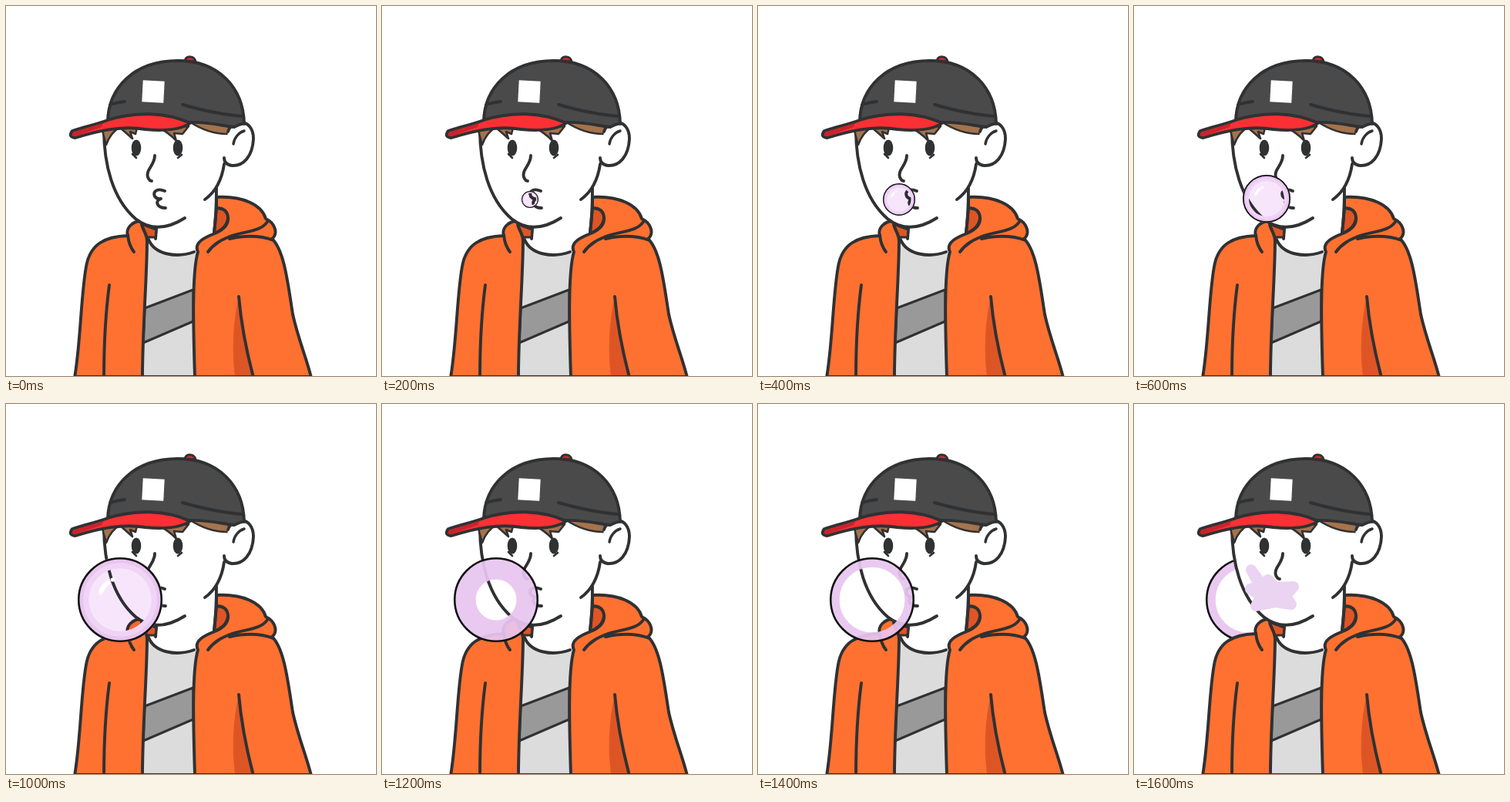
An HTML page for the animation above (1.8 s loop, 480x480 px).

```html
<!DOCTYPE html>
<html lang="en">
<head>
<meta charset="utf-8">
<title>Bubble gum</title>
<style>
  html, body { margin: 0; width: 100%; height: 100%; overflow: hidden; background: #fff; }
  svg { display: block; width: 100vw; height: 100vh; }
  .ink { fill: none; stroke: #303133; stroke-width: 3.9; stroke-linecap: round; stroke-linejoin: round; }
  .orange { fill: #ff7130; }
  .rust { fill: #de5525; }
  .white { fill: #fff; }
  .hair { fill: #a5734c; stroke-width: 2.6; }
</style>
</head>
<body>
<svg viewBox="0 0 480 480">
  <g id="behind"></g>

  <g class="ink">
    <!-- shirt and strap -->
    <path fill="#dcdcdc" stroke="none" d="M180 300H247V480H177Z"/>
    <path fill="#999" stroke-width="3" d="M180 392 243 368V409L178 437Z"/>

    <!-- neck -->
    <path class="white" stroke="none" d="M195 270 273 230 270 292 246 320Q207 331 184 304Z"/>
    <path d="M185 303C193 323 222 327 244 319M195 289 194 302"/>

    <!-- hood lining -->
    <path class="rust" d="M273 262C283 262 289 267 288 275C287 284 282 290 270 295Z"/>
    <path class="rust" stroke-width="3" d="M176 283 195 290 194 300 183 300Z"/>

    <!-- jacket -->
    <path class="orange" d="M89 482C97 436 97 376 104 338C109 309 128 299 158 298C155 288 164 279 176 279C174 287 182 292 183 304C183 350 177 420 177 482Z"/>
    <path class="orange" d="M245 482C243 420 241 345 249 319C243 307 258 300 271 295C283 290 289 283 288 274C287 265 281 262 273 262V248C307 246 332 258 337 276C350 282 353 296 345 302C361 316 366 362 372 400C379 432 389 454 396 482Z"/>
    <path class="rust" stroke="none" d="M302 377C294 410 293 450 297 480H320C312 448 305 412 302 377Z"/>
    <path d="M134 362C129 400 127 440 127 482M302 377C305 412 312 448 321 482M158 297C159 308 162 314 166 319M262 319C270 308 280 303 293 298C313 292 331 292 339 280M290 302C312 297 331 298 347 304M273 236Q273 270 270 293"/>
    <path stroke-width="2" d="M89 480H396"/>

    <!-- head -->
    <path class="white" stroke="none" d="M126 158C127 205 138 250 168 276C188 292 210 289 232 275L258 251C274 240 280 220 283 203L296 150Z"/>
    <path d="M127 160C127 205 138 250 168 276C188 292 210 289 232 275M283 205C280 226 272 241 258 251"/>
    <path class="hair" d="M124 157Q127 170 130 180Q135 165 148 157Z"/>
    <path class="hair" d="M146 156 164 172 161 163 168 166 170 158ZM198 158Q211 164 221 175L218 165 229 166 237 156Z"/>
    <path class="hair" d="M238 150Q262 166 287 166L299 153Z"/>
    <path class="white" d="M288 163C294 145 321 146 321 172C320 195 308 208 293 207C286 206 283 202 283 197"/>
    <path stroke-width="3.4" d="M309 162C302 164 296 171 295 179"/>

    <!-- cap -->
    <path fill="#4a4a4b" d="M132 149C133 108 164 71 223 71C276 71 308 106 309 153Q306 152 296 157C279 155 260 150 238 151Q185 134 132 149Z"/>
    <path d="M135 128Q144 125 154 124M229 128C254 135 280 141 307 143"/>
    <path fill="#fb3034" d="M86 162C104 156 116 154 132 148C166 137 207 137 239 152C224 162 202 162 181 160C152 155 122 161 90 171Q80 170 86 162Z"/>
    <path fill="#c9232b" stroke="none" d="M87 164 126 152 124 157 90 169Q83 169 87 164Z"/>
    <path fill="#d9262a" stroke-width="3" d="M232 71C234 64 244 64 246 72Z"/>
    <rect class="white" stroke="none" x="177" y="97" width="28" height="28" transform="rotate(3 191 111)"/>

    <!-- eyes, nose, mouth -->
    <g fill="#303133" stroke="none">
      <ellipse cx="169" cy="184" rx="6.3" ry="10.5"/>
      <ellipse cx="223" cy="184" rx="6.3" ry="10.5"/>
    </g>
    <path stroke-width="2.6" d="M164 192 169 197M223 197 228 193"/>
    <path d="M193 194C193 207 181 212 184 222Q186 227 189 227M206 240C197 236 190 240 193 247Q196 251 201 250C193 252 195 262 207 262"/>
  </g>

  <g id="front"></g>
  <path id="splat" fill="#ebd3f2" stroke="#ebd3f2" stroke-width="14" stroke-linecap="round" stroke-linejoin="round"
    d="M152 215 165 233 174 228 183 238 207 237 197 249 204 260 184 257 158 262 165 249 151 240 163 236Z"/>
</svg>

<script>
const STEP = 200;
const PINK = '#e9c5f0';
// Per step: centre x, centre y, radius, clear share of the radius
const bubbles = [
  null, [192, 251, 11, 0], [183, 251, 21, 0], [172, 250, 31, 0], [162, 249, 41, 0],
  [148, 254, 55, 0], [148, 254, 55, 0.48], [148, 254, 55, 0.77], [148, 254, 55, 0.77]
];
const [behind, front, splat] = ['behind', 'front', 'splat'].map(id => document.getElementById(id));

const ring = (x, y, inner, outer, color, style = '') =>
  `<circle cx="${x}" cy="${y}" r="${(inner + outer) / 2}" fill="none" stroke="${color}" stroke-width="${outer - inner}" style="${style}"/>`;

function bubble([x, y, r, clear]) {
  const line = 0.7 + r / 30;
  const edge = ring(x, y, r - line, r, '#111');
  if (clear) return ring(x, y, r * clear, r - 1, PINK, 'opacity:.93') + edge;
  const tint = `<circle cx="${x}" cy="${y}" r="${r * 0.76}" fill="#f7e6fb" style="mix-blend-mode:multiply"/>`;
  const shine = `<g transform="translate(${x} ${y}) scale(${r / 55})" fill="none" stroke="#fff" stroke-linecap="round">
    <path stroke-width="6" d="M-25-10Q-22-18-16-22"/><path stroke-width="5" d="M-10-26h1"/></g>`;
  return tint + ring(x, y, r * 0.74, r * 0.88, '#efd4f6') + ring(x, y, r * 0.87, r, PINK) + shine + edge;
}

let shown = -1;
function draw(now) {
  const step = Math.floor(now / STEP) % bubbles.length;
  if (step !== shown) {
    shown = step;
    const popped = step === bubbles.length - 1;
    const art = bubbles[step] ? bubble(bubbles[step]) : '';
    behind.innerHTML = popped ? art : '';
    front.innerHTML = popped ? '' : art;
    splat.style.display = popped ? '' : 'none';
  }
  requestAnimationFrame(draw);
}
draw(performance.now());
</script>
</body>
</html>
```
